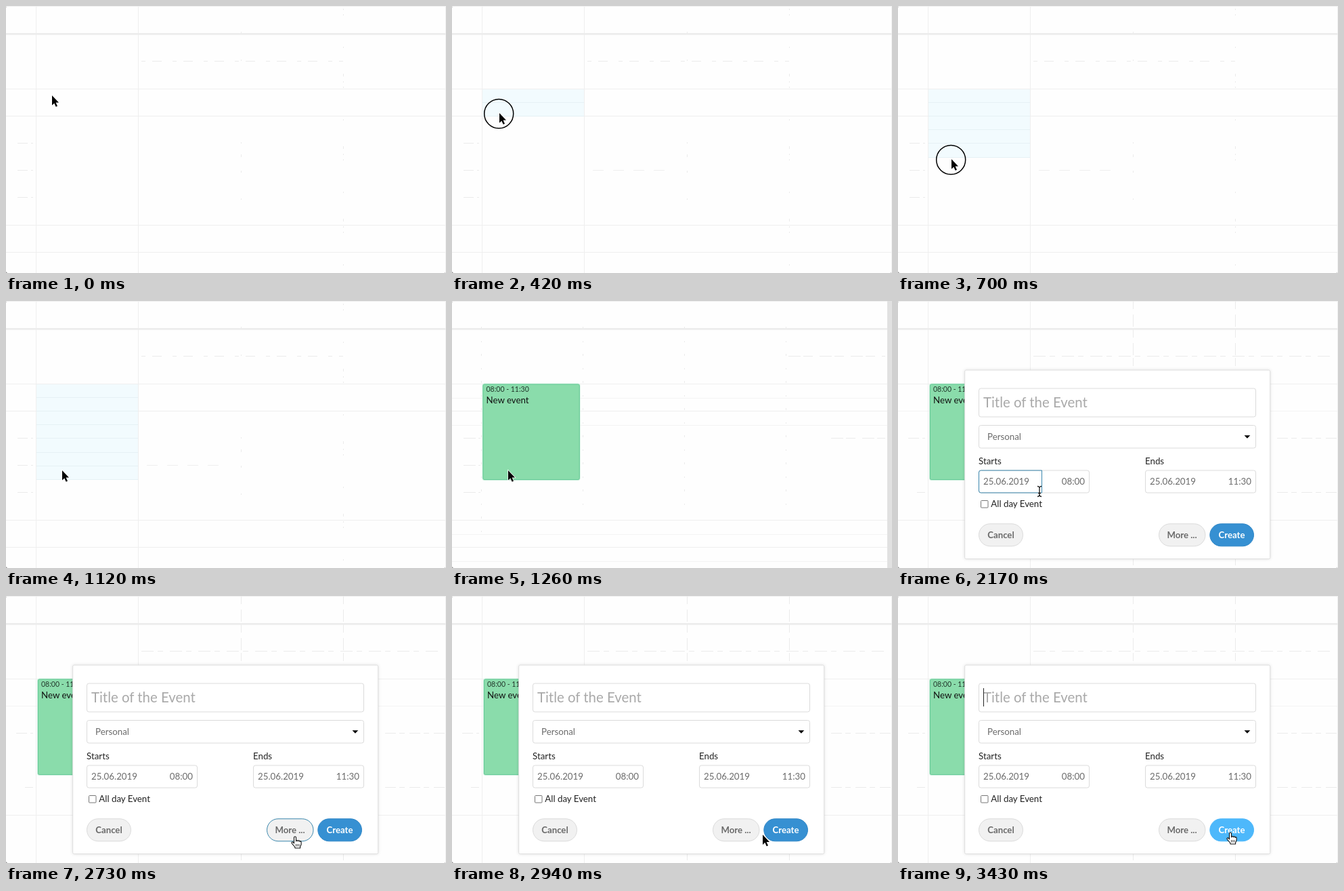
Recreate the animation shown at these times as an HTML page. Size 650x394 px, loop 3500 ms.

```html
<!DOCTYPE html>
<html lang="en">
<head>
<meta charset="utf-8">
<title>Creating a calendar event</title>
<style>
  html, body { margin: 0; height: 100%; overflow: hidden; background: #777; }
  svg { display: block; width: 650px; height: 394px; font: 13.3px Lato, "Open Sans", sans-serif; }
  .grid path { fill: none; stroke: #efefef; }
  .grid .dots { stroke: #ebebeb; }
  .grid .head { stroke: #ececec; stroke-width: 2.5; }
  .field { fill: #fff; stroke: #dbdbdb; }
  .value { fill: #6b6b6b; }
  .label { fill: #222; }
  .button rect { fill: #f1f1f1; stroke: #dbdbdb; }
  .button text { fill: #6a6a6a; font-size: 13.2px; font-weight: bold; text-anchor: middle; }
  .button.hover rect { stroke: #3a87ad; }
  .primary rect { fill: #3690d2; stroke: #2f86c6; }
  .primary text { fill: #fff; }
  .primary.hover rect { fill: #4db8fb; stroke: #4db8fb; }
  .end { text-anchor: end; }
</style>
</head>
<body>
<svg viewBox="0 0 650 394">
  <rect width="650" height="394" rx="3" fill="#fefefe"/>

  <g class="grid" id="plainGrid">
    <path d="M0 .5H650M649.5 0V394M44.5 0V394M195.5 0V394M0 122.5H650M0 162.5H650M0 323.5H650M0 363.5H650"/>
    <path class="dots" d="M200 81.5H498" stroke-dasharray="6 10 14 16"/>
    <path class="dots" d="M17 202.5H40M17 242.5H40M17 282.5H40" stroke-dasharray="15 5 3 9"/>
    <path class="dots" d="M347.5 38V394" stroke-dasharray="3 38 2 120 2 16 4 20"/>
    <path class="dots" d="M498.5 4V394" stroke-dasharray="2 6 2 46 2 38 4 7"/>
    <path class="head" d="M0 41.2H650"/>
  </g>

  <g class="grid" id="scrollGrid">
    <path d="M0 .5H643M0 122.5H643M0 162.5H643M0 323.5H643M0 363.5H643"/>
    <path d="M0 143.5H643M0 183.5H643M0 344.5H643M0 384.5H643" stroke-opacity=".6"/>
    <path class="dots" d="M497 81.5H640M560 202.5H640M17 202.5H42M17 242.5H42M17 282.5H42" stroke-dasharray="18 4 14 10"/>
    <path class="dots" d="M43.5 38V350M193.5 38V310M343.5 38V310M493.5 38V310" stroke-dasharray="3 18 2 17"/>
    <path class="head" d="M0 41.2H643"/>
    <rect x="643" width="7" height="394" fill="#e1e1e1"/>
  </g>

  <g class="grid" id="modalGrid">
    <path d="M0 .5H650M649.5 0V394M44.5 0V394M195.5 0V394M0 122.5H650M0 323.5H650"/>
    <path d="M0 162.5H650" stroke-opacity=".6"/>
    <path class="dots" d="M200 81.5H640" stroke-dasharray="18 6 8 10"/>
    <path class="dots" d="M15 202.5H40M560 202.5H648M28 282.5H40M560 282.5H648" stroke-dasharray="16 5 8 7"/>
    <path class="dots" d="M347.5 0V394M498.5 0V394" stroke-dasharray="12 8 18 4"/>
    <path class="head" d="M0 41.2H650"/>
  </g>

  <g id="selection">
    <rect id="range" x="45" y="123" width="150" fill="#f2fbfe"/>
    <path id="rangeLines" fill="none" stroke="#e6f1f5"/>
    <path d="M208 242.5H322" stroke="#efefef" stroke-dasharray="16 14"/>
  </g>

  <g id="event">
    <rect x="44.5" y="121.5" width="145" height="143.5" rx="3" fill="#d8f3e4"/>
    <rect x="45.9" y="122.9" width="142.4" height="140.7" rx="2" fill="#8adcab" stroke="#5fc793"/>
    <text x="50.5" y="133.6" font-size="10.5" fill="#23382c">08:00 - 11:30</text>
    <text x="50.5" y="150.8" fill="#111">New event</text>
  </g>

  <g id="modal">
    <rect x="98.7" y="102" width="451" height="278.5" rx="2" fill="#fff" stroke="#dedede"
          style="filter:drop-shadow(0 0 2px rgba(0,0,0,.12))"/>
    <rect class="field" x="119.5" y="129" width="409" height="42" rx="3"/>
    <text x="126" y="156.8" font-size="20.4" fill="#a9a9a9">Title of the Event</text>
    <path id="caret" d="M126.5 136V163" stroke="#222"/>
    <rect class="field" x="119.5" y="183.5" width="409" height="33.5" rx="3"/>
    <text class="value" x="132" y="204.8">Personal</text>
    <path d="M511.5 198.3H520.3L515.9 202.8Z"/>
    <text class="label" x="119" y="240.8">Starts</text>
    <text class="label" x="365" y="240.8">Ends</text>
    <rect class="field" x="119.5" y="250" width="163" height="33" rx="3"/>
    <rect class="field" x="365.5" y="250" width="163" height="33" rx="3"/>
    <path id="dateFocus" d="M212.5 250H122.5a3 3 0 0 0 -3 3V280a3 3 0 0 0 3 3H212.5Z" fill="none" stroke="#3a87ad"/>
    <g class="value">
      <text x="126" y="270.8">25.06.2019</text>
      <text class="end" x="276" y="270.8">08:00</text>
      <text x="372" y="270.8">25.06.2019</text>
      <text class="end" x="522" y="270.8">11:30</text>
    </g>
    <rect x="122.5" y="294.5" width="10.5" height="10.5" rx="1" fill="#fff" stroke="#777"/>
    <text class="label" x="137.3" y="304">All day Event</text>
    <g class="button">
      <rect x="119.5" y="328.8" width="65" height="33" rx="16.5"/><text x="152" y="350">Cancel</text>
    </g>
    <g class="button" id="more">
      <rect x="385.5" y="328.8" width="68.5" height="33" rx="16.5"/><text x="419.5" y="350">More ...</text>
    </g>
    <g class="button primary" id="create">
      <rect x="460.8" y="328.8" width="64.7" height="33" rx="16.5"/><text x="493" y="350">Create</text>
    </g>
  </g>

  <g id="pointer">
    <circle id="press" cx="-.8" cy="1" r="21.5" fill="none" stroke="#000" stroke-width="1.5"/>
    <path id="arrow" d="M0 0V14.6L3.3 11.5L5.7 16.8L8 15.8L5.6 10.6H10Z" stroke="#fff" stroke-width="1.4" paint-order="stroke"/>
    <g id="beam" fill="none">
      <path d="M-3 -7.5Q0 -7.5 0 -5V5Q0 7.5 -3 7.5M3 -7.5Q0 -7.5 0 -5V5Q0 7.5 3 7.5M-2 2.5H2" stroke="#fff" stroke-width="3"/>
      <path d="M-3 -7.5Q0 -7.5 0 -5V5Q0 7.5 -3 7.5M3 -7.5Q0 -7.5 0 -5V5Q0 7.5 3 7.5M-2 2.5H2" stroke="#111" stroke-width="1.3"/>
    </g>
    <g id="hand" stroke="#111" stroke-linejoin="round">
      <path d="M-1.5 10V1.5a1.5 1.5 0 0 1 3 0V7a1.4 1.4 0 0 1 2.8 0a1.3 1.3 0 0 1 2.6 .4a1.2 1.2 0 0 1 2.2 .6v3.5l-1.5 3.5v2h-7.5l-.6 -2l-4 -4.6c-1.5 -2 .5 -3.2 1.8 -2z" fill="#fff" stroke-width="1.1"/>
      <path d="M1.5 11V14.5M3.7 11V14.5M5.9 11V14.5" stroke-width=".8"/>
    </g>
  </g>
</svg>
<script>
const LOOP = 3500, TICK = 70, OPEN = 1330;
const $ = id => document.getElementById(id);
const show = (id, on) => { $(id).style.display = on ? "" : "none"; };

// Pointer path: time, x, y
const path = [
  [210, 68, 132], [420, 70, 158], [700, 79, 226], [770, 81, 245], [840, 83, 250],
  [2030, 83, 250], [2100, 115, 260], [2170, 209, 281], [2240, 300, 307], [2310, 360, 330],
  [2450, 427, 355], [2730, 427, 355], [2870, 443, 354], [3080, 491, 349]
];

function pointerAt(t) {
  const next = path.findIndex(p => p[0] > t);
  if (next < 0) return path[path.length - 1].slice(1);
  if (next === 0) return path[0].slice(1);
  const [t0, x0, y0] = path[next - 1], [t1, x1, y1] = path[next];
  const k = (t - t0) / (t1 - t0);
  return [x0 + (x1 - x0) * k, y0 + (y1 - y0) * k];
}

// Half-hour slots selected; the highlight trails the pointer by one tick
function selectedRows(t) {
  if (t < 280) return 0;
  if (t >= 770) return 7;
  return Math.ceil((pointerAt(t - TICK)[1] - 122) / 20);
}

function draw(t) {
  const [x, y] = pointerAt(t);
  const open = t >= OPEN, created = t >= 1260;
  const over = (x0, y0, x1, y1) => open && x >= x0 && x <= x1 && y >= y0 && y <= y1;

  show("plainGrid", !created);
  show("scrollGrid", created && !open);
  show("modalGrid", open);
  show("event", created);
  $("event").setAttribute("transform", `translate(${open ? 1.5 : 0})`);
  show("modal", open);

  const rows = selectedRows(t);
  show("selection", rows && !created);
  $("range").setAttribute("height", rows * 20.1);
  let lines = "";
  for (let i = 1; i <= rows; i++) lines += `M45 ${Math.floor(122.5 + i * 20.1) + .5}H195`;
  $("rangeLines").setAttribute("d", lines);

  const onMore = over(385, 329, 454, 362), onCreate = over(460, 329, 526, 362);
  const onDate = over(119, 250, 212, 283);
  const hand = onMore || onCreate;
  $("more").classList.toggle("hover", onMore);
  $("create").classList.toggle("hover", onCreate);
  show("dateFocus", onDate);
  show("caret", t < 1680 || (t >= 2240 && t < 2730) || t >= 3290);

  $("pointer").setAttribute("transform", `translate(${x} ${y})`);
  show("press", t >= 140 && t < 1120);
  show("hand", hand);
  show("beam", onDate);
  show("arrow", !hand && !onDate);
}

function frame() {
  draw(Math.floor(performance.now() % LOOP / TICK) * TICK);
  requestAnimationFrame(frame);
}
frame();
</script>
</body>
</html>
```
